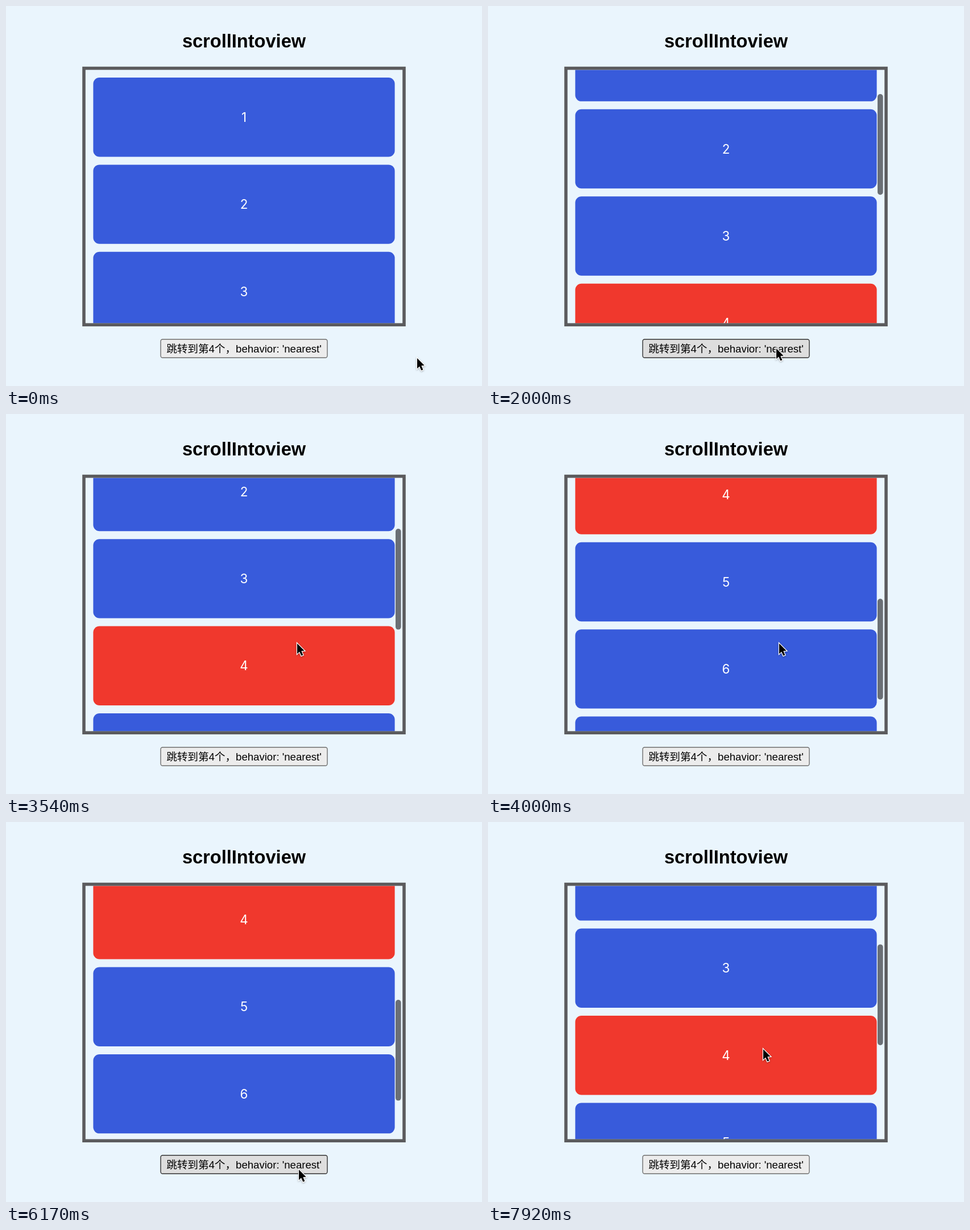
Write an HTML page that moves like this. It is 837 by 669 pixels and loops after 8000 ms.

```html
<!DOCTYPE html>
<html lang="zh-CN">
<head>
<meta charset="utf-8">
<title>scrollIntoview</title>
<style>
  html, body { margin: 0; width: 100%; height: 100%; overflow: hidden; background: #eaf5fd; }
  svg { display: block; width: 837px; height: 669px; }
  text { font-family: "Liberation Sans", "Noto Sans CJK SC", "Noto Sans CJK", sans-serif; text-anchor: middle; }
  .title { font-size: 32.6px; font-weight: bold; }
  .item { fill: #385bdb; }
  .item.goal { fill: #f0382d; }
  .digit { font-family: Inter, "Liberation Sans", sans-serif; font-size: 22.3px; fill: #fff; }
  .label { font-size: 18.6px; }
  #button { fill: #ececec; stroke: #6f6f6f; stroke-width: 1.4; }
  #button.hover { fill: #dedede; stroke: #333; }
  #cursor { filter: drop-shadow(0 1.5px 1.5px rgba(0, 0, 0, .3)); }
</style>
</head>
<body>
<svg viewBox="0 0 837 669">
  <defs>
    <clipPath id="view"><rect x="139.8" y="112.4" width="557.4" height="446"/></clipPath>
  </defs>
  <text class="title" x="418.5" y="73">scrollIntoview</text>
  <g clip-path="url(#view)">
    <g id="list"></g>
    <rect id="thumb" x="685" width="9.6" height="177.5" rx="4.8" fill="#6a6f75"/>
  </g>
  <rect x="137" y="109.6" width="563" height="451.6" fill="none" stroke="#5b5b5d" stroke-width="5.6"/>
  <rect id="button" x="272" y="586.7" width="293" height="32.6" rx="3.5"/>
  <text class="label" x="418.5" y="610">跳转到第4个，behavior: 'nearest'</text>
  <g id="cursor">
    <path d="M1 2V20.2L5.1 16.4L8.3 23.6L11.4 22.3L8.3 15.2L13.7 14.8Z"
      fill="#000" stroke="#fff" stroke-width="2.4" paint-order="stroke"/>
  </g>
</svg>
<script>
const LOOP = 8000, PITCH = 153.4, TOP = 126;
const $ = id => document.getElementById(id);

const linear = u => u;
const smooth = u => u * u * (3 - 2 * u);
const easeIn = u => u * u * (2 - u);
const easeOut = u => 1 - (1 - u) ** 2;

// Each step: time, value(s), easing used to reach it
const scrollSteps = [
  [0, [0]],
  [1780, [0]], [2180, [168.6], smooth],
  [3400, [168.6]], [3650, [265], easeIn], [4000, [513]], [4300, [641.4], easeOut],
  [5830, [641.4]], [6230, [474.2], smooth],
  [7160, [474.2]], [7380, [414.2], easeIn], [7920, [245.2]]
];
const cursorSteps = [
  [0, [722, 618]],
  [830, [640, 629], smooth], [1670, [508, 609], smooth], [1780, [506, 601]],
  [2710, [506, 601]], [3200, [511, 402], smooth],
  [4750, [511, 402]], [5130, [521, 625], smooth], [5540, [514, 610], smooth],
  [6750, [514, 610]], [7150, [483, 398], smooth]
];
const thumbSteps = [
  [0, [0]],
  [1780, [0]], [1820, [1]], [2710, [1]], [2920, [0]],
  [3400, [0]], [3440, [1]], [4750, [1]], [4960, [0]],
  [5800, [0]], [5840, [1]], [6750, [1]], [6960, [0]],
  [7160, [0]], [7200, [1]]
];

function sample(steps, t) {
  const i = steps.findIndex(s => s[0] > t);
  if (i < 0) return steps[steps.length - 1][1];
  const [t0, from] = steps[i - 1];
  const [t1, to, ease = linear] = steps[i];
  const u = ease((t - t0) / (t1 - t0));
  return from.map((v, k) => v + (to[k] - v) * u);
}

$("list").innerHTML = Array.from({ length: 7 }, (_, i) => {
  const y = TOP + i * PITCH;
  return `<rect class="item${i === 3 ? " goal" : ""}" x="153.4" y="${y}" width="530.2" height="139.4" rx="11"/>
    <text class="digit" x="418.5" y="${y + 77.8}">${i + 1}</text>`;
}).join("");

function draw(t) {
  const [scroll] = sample(scrollSteps, t);
  const [x, y] = sample(cursorSteps, t);
  $("list").setAttribute("transform", `translate(0 ${-scroll})`);
  $("thumb").setAttribute("y", 115.1 + scroll * 0.409);
  $("thumb").setAttribute("opacity", sample(thumbSteps, t)[0]);
  $("cursor").setAttribute("transform", `translate(${x} ${y})`);
  const over = x > 271 && x < 566 && y > 586 && y < 620;
  $("button").classList.toggle("hover", over);
}

const start = performance.now();
function tick() {
  draw((performance.now() - start) % LOOP);
  requestAnimationFrame(tick);
}
draw(0);
requestAnimationFrame(tick);
</script>
</body>
</html>
```
